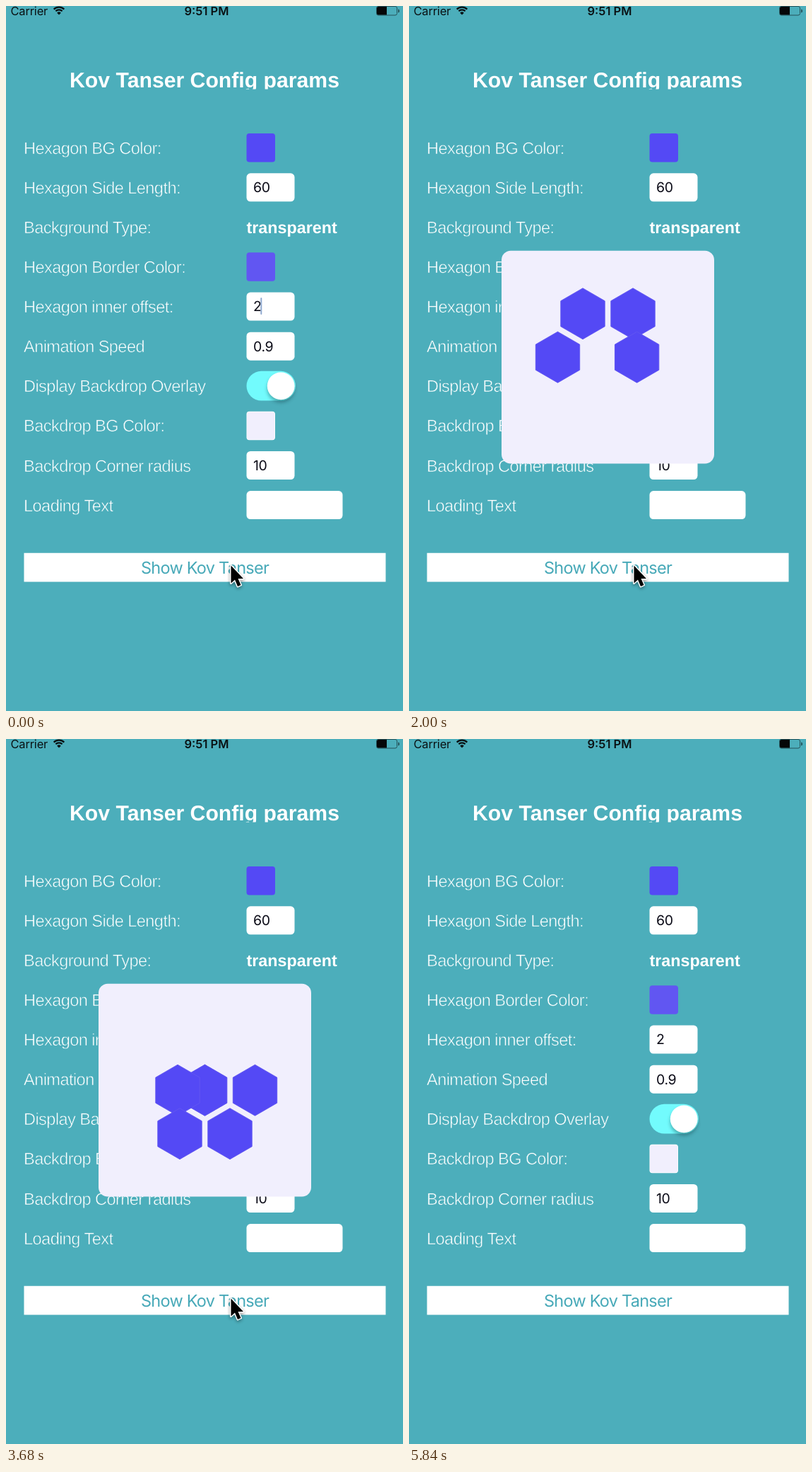
An HTML page with a canvas for the animation above (5920 ms loop, 562x996 px).

```html
<!DOCTYPE html>
<html lang="en">
<head>
<meta charset="utf-8">
<title>Loader settings</title>
<style>
html, body { margin: 0; width: 100%; height: 100%; overflow: hidden; background: #4caebb; }
canvas { display: block; width: 562px; height: 996px; }
</style>
</head>
<body>
<canvas id="stage" width="562" height="996"></canvas>
<script>
const ctx = document.getElementById('stage').getContext('2d');
const LOOP = 5920, STEP = 80;
const TEAL = '#4caebb', VIOLET = '#5449f5', EDGE = '#6156f2', LILAC = '#f1effd';
const SANS = '"Liberation Sans", Arial, sans-serif';
const UI = 'Inter, Roboto, sans-serif';
const ROW_TOP = 180, ROW_GAP = 56.1, COL = 340.5;
const LABELS = [
  'Hexagon BG Color:', 'Hexagon Side Length:', 'Background Type:',
  'Hexagon Border Color:', 'Hexagon inner offset:', 'Animation Speed',
  'Display Backdrop Overlay', 'Backdrop BG Color:', 'Backdrop Corner radius',
  'Loading Text'
];

// Hexagon cluster, listed row by row as unit offsets from the middle
const MID = { x: 281.5, y: 496.2 }, DX = 35.5, DY = 61.5, RADIUS = 36;
const SLOTS = [[-1, -1], [1, -1], [-2, 0], [2, 0], [-1, 1], [1, 1]];
const OUT_START = 646, OUT_TIME = 360;
const IN_START = 2815, IN_TIME = 349;
const CYCLE = IN_START + 6 * IN_TIME - OUT_START;

const clamp = v => Math.max(0, Math.min(1, v));
const span = (t, a, b) => clamp((t - a) / (b - a));
const easeIn = p => p * p;
const easeInOut = p => p < .5 ? 2 * p * p : 1 - 2 * (1 - p) * (1 - p);
const rowY = i => ROW_TOP + ROW_GAP * i;

function box(x, y, w, h, r, fill) {
  ctx.fillStyle = fill;
  ctx.beginPath();
  ctx.roundRect(x, y, w, h, r);
  ctx.fill();
}

function text(str, x, y, font, color, spacing = 0, align = 'left') {
  ctx.font = font;
  ctx.letterSpacing = spacing + 'px';
  ctx.textAlign = align;
  ctx.fillStyle = color;
  ctx.fillText(str, x, y);
}

// Thin the strokes to get a light weight
function lightText(str, x, y) {
  text(str, x, y, '23.6px ' + SANS, '#fff', -.58);
  ctx.strokeStyle = TEAL;
  ctx.lineWidth = .6;
  ctx.strokeText(str, x, y);
}

function statusBar() {
  text('Carrier', 6.5, 13, '16.5px ' + UI, '#0a1214', -.2);
  text('9:51 PM', 284, 13, '600 16.5px ' + UI, '#0a1214', 0, 'center');
  ctx.strokeStyle = ctx.fillStyle = '#0a1214';
  ctx.lineWidth = 2.2;
  const up = -Math.PI / 2, half = .78;
  for (const r of [6.6, 10.4]) {
    ctx.beginPath();
    ctx.arc(75, 12, r, up - half, up + half);
    ctx.stroke();
  }
  ctx.beginPath();
  ctx.moveTo(75, 12.5);
  ctx.arc(75, 12.5, 4, up - half, up + half);
  ctx.fill();
  ctx.strokeStyle = '#25535a';
  ctx.lineWidth = 1;
  ctx.beginPath();
  ctx.roundRect(524.5, .5, 29, 12.5, 2.5);
  ctx.stroke();
  box(525, 1, 14, 11.5, [2, 0, 0, 2], '#050708');
  box(555, 4.5, 2, 5, [0, 2, 2, 0], '#25535a');
}

function heading() {
  ctx.save();
  ctx.beginPath();
  ctx.rect(0, 80, 562, 37.5);
  ctx.clip();
  text('Kov Tanser Config params', 281, 115, 'bold 30.2px ' + SANS, '#fff', 0, 'center');
  ctx.restore();
}

function swatch(row, color) {
  box(COL, rowY(row), 40.5, 40.5, 4, color);
}

function field(row, value, width = 68) {
  box(COL, rowY(row) + .2, width, 40, 5.5, '#fff');
  text(value, 350, rowY(row) + 27, '19.5px ' + UI, '#0b0b17', -.4);
}

function toggle(row) {
  const y = rowY(row);
  box(COL, y - .8, 69.5, 41.8, 20.9, '#72fbfd');
  ctx.save();
  ctx.shadowColor = 'rgba(0,40,50,.35)';
  ctx.shadowBlur = 5;
  ctx.shadowOffsetY = 4;
  box(369.8, y + .8, 38.8, 38.8, 19.4, '#fff');
  ctx.restore();
}

function form(t) {
  LABELS.forEach((label, i) => lightText(label, 25, rowY(i) + 28.7));
  swatch(0, VIOLET);
  field(1, '60');
  text('transparent', COL, rowY(2) + 28.8, 'bold 23.3px ' + SANS, '#fff');
  swatch(3, EDGE);
  field(4, '2');
  if (t < 1000) box(360.3, rowY(4) + 7.5, 2, 24, 1, '#8fa9cf');
  field(5, '0.9');
  toggle(6);
  swatch(7, '#fff');
  box(COL + .7, rowY(7) + .7, 39.1, 39.1, 3.5, LILAC);
  field(8, '10');
  field(9, '', 136);
}

function button(t) {
  box(25.5, 772.7, 512, 40.8, 0, '#fff');
  const pressed = t >= 160 ? 1 - span(t, 320, 640) : 0;
  ctx.globalAlpha = 1 - .75 * pressed;
  text('Show Kov Tanser', 281.5, 802, '23.5px ' + UI, '#47a9b8', -.75, 'center');
  ctx.globalAlpha = 1;
}

function hexagon(x, y) {
  ctx.beginPath();
  for (let i = 0; i < 6; i++) {
    const a = Math.PI / 6 + i * Math.PI / 3;
    ctx.lineTo(x + RADIUS * Math.cos(a), y + RADIUS * Math.sin(a));
  }
  ctx.closePath();
  ctx.fillStyle = VIOLET;
  ctx.fill();
  ctx.strokeStyle = EDGE;
  ctx.lineWidth = 1;
  ctx.stroke();
}

function loader(t) {
  const alpha = span(t, 416, 720) * (1 - span(t, 5360, 5680));
  if (!alpha) return;
  ctx.globalAlpha = alpha;
  box(131, 345.8, 301, 300.8, 13, LILAC);
  const local = t < OUT_START ? t : OUT_START + (t - OUT_START) % CYCLE;
  SLOTS.forEach(([cx, cy], i) => {
    const born = OUT_START + i * OUT_TIME;
    if (local < born) return;
    const back = IN_START + i * IN_TIME;
    const reach = easeIn(span(local, born, born + OUT_TIME)) -
                  easeInOut(span(local, back, back + IN_TIME));
    hexagon(MID.x + cx * DX * reach, MID.y + cy * DY * reach);
  });
  ctx.globalAlpha = 1;
}

function pointer(t) {
  if (t >= 4400) return;
  const p = easeInOut(span(t, 3980, 4300));
  ctx.save();
  ctx.translate(318.5 + 169 * p, 790.5 + 45.5 * p);
  ctx.beginPath();
  [[0, 0], [0, 25], [5.5, 20], [9.5, 29.5], [14, 27.5], [10, 18.5], [17.5, 18.5]]
    .forEach(([x, y]) => ctx.lineTo(x, y));
  ctx.closePath();
  ctx.lineWidth = 3;
  ctx.strokeStyle = '#fff';
  ctx.shadowColor = 'rgba(0,0,0,.4)';
  ctx.shadowBlur = 4;
  ctx.shadowOffsetY = 2;
  ctx.stroke();
  ctx.shadowColor = 'transparent';
  ctx.fillStyle = '#000';
  ctx.fill();
  ctx.restore();
}

function draw(t) {
  ctx.fillStyle = TEAL;
  ctx.fillRect(0, 0, 562, 996);
  statusBar();
  heading();
  form(t);
  button(t);
  loader(t);
  pointer(t);
}

ctx.textRendering = 'geometricPrecision';
ctx.lineJoin = 'round';
const start = performance.now();
function tick() {
  const t = (performance.now() - start) % LOOP;
  draw(Math.floor(t / STEP) * STEP);
  requestAnimationFrame(tick);
}
tick();
</script>
</body>
</html>
```
